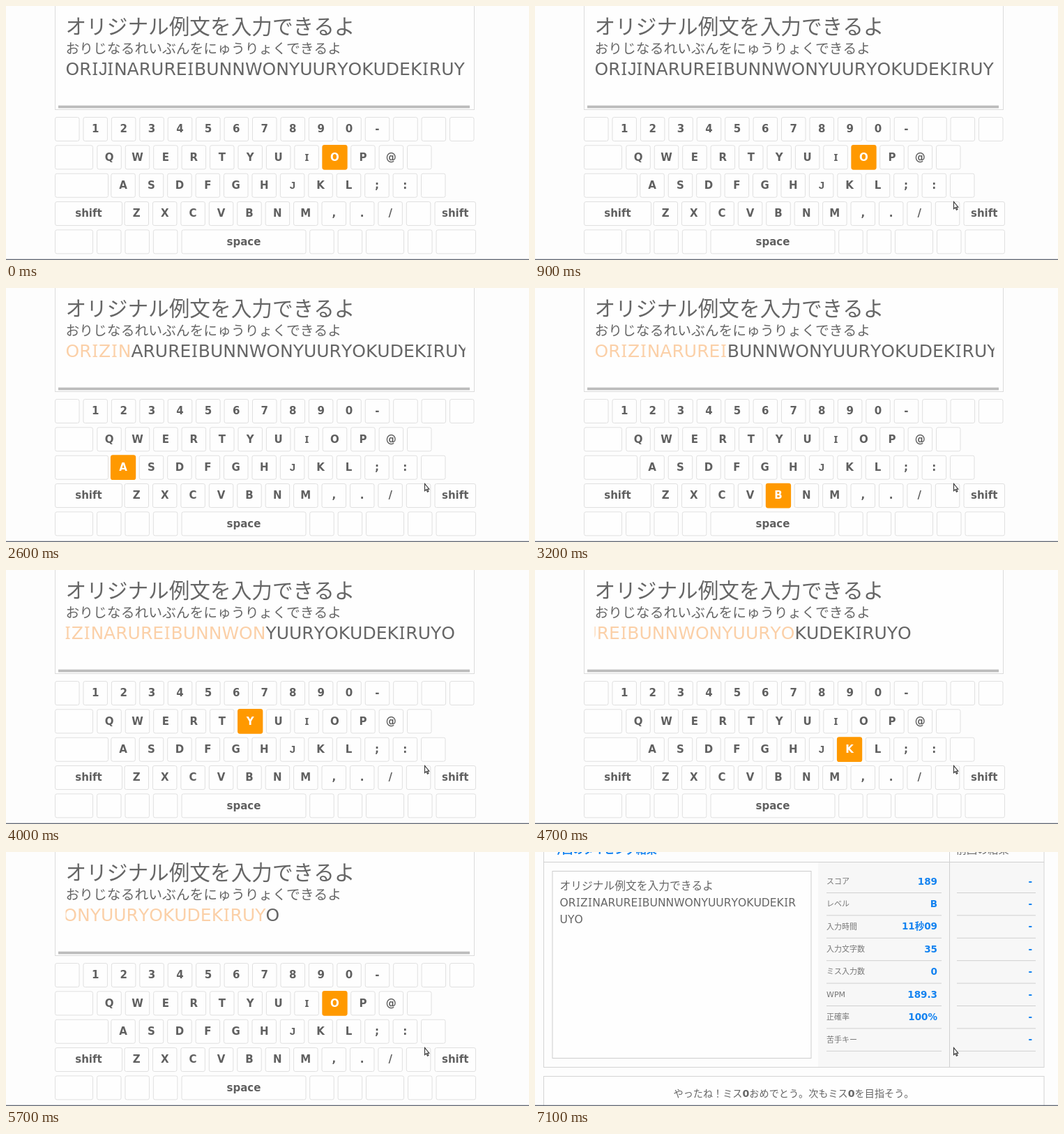
Write an HTML page that moves like this. It is 750 px wide and 364 px high and loops after 7.2 s.

```html
<!DOCTYPE html>
<html lang="ja">
<head>
<meta charset="utf-8">
<title>Typing practice</title>
<style>
  html, body { margin: 0; width: 100%; height: 100%; overflow: hidden; background: #fdfdfd; }
  svg { display: block; width: 750px; height: 364px; }
  text {
    font-family: 'DejaVu Sans', 'Noto Sans CJK JP', 'Noto Sans CJK', sans-serif;
    font-kerning: none; fill: #666; white-space: pre;
  }
  /* Serifed I, and a J that sits on the baseline */
  .I { font-family: 'Noto Sans', sans-serif; letter-spacing: .04em; }
  .J { font-family: 'Liberation Sans', sans-serif; letter-spacing: -.045em; }
  .key rect { fill: #fefefe; stroke: #e0e0e0; }
  .key text { font-size: 15px; font-weight: 700; fill: #606060; text-anchor: middle; }
  .key.on rect { fill: #ff9900; stroke: #ff9900; stroke-width: 1.8; }
  .key.on text { fill: #fff; }
  .done { fill: #fbd0a8; }
  .value { font-size: 13.5px; font-weight: 700; fill: #1583f0; text-anchor: end; }
  .label { font-size: 11px; fill: #777; }
</style>
</head>
<body>
<svg viewBox="0 0 750 364">
  <defs><clipPath id="window"><rect x="85.5" y="70" width="573" height="45"/></clipPath></defs>
  <rect width="750" height="364" fill="#fdfdfd"/>
  <g id="game"></g>
  <g id="result"></g>
  <rect y="362.7" width="750" height="1.3" fill="#616773"/>
  <path id="mouse" d="M0 0V10.2L2.3 8.2L3.9 11.8L5.4 11.1L3.9 7.7H6.3Z" fill="#fff" stroke="#333" stroke-width="1.1"/>
</svg>
<script>
const LOOP = 7200, STEP = 100, TYPE_START = 1900, TYPE_END = 5800;
const LEFT = 85.5, CARET = 372.5;
const JP = 'オリジナル例文を入力できるよ';
const TAIL = 'INARUREIBUNNWONYUURYOKUDEKIRUYO';
const GUIDE = 'ORIJ' + TAIL, TYPED = 'ORIZ' + TAIL;
const byId = id => document.getElementById(id);
const game = byId('game'), result = byId('result'), mouse = byId('mouse');

function add(parent, tag, attrs = {}, content = '') {
  const el = document.createElementNS('http://www.w3.org/2000/svg', tag);
  for (const k in attrs) el.setAttribute(k, attrs[k]);
  el.textContent = content;
  parent.append(el);
  return el;
}
// Fills an element with text, giving I and J their own face
function letters(el, content) {
  el.textContent = '';
  for (const part of content.split(/([IJ])/)) {
    if (!part) continue;
    const attrs = /^[IJ]$/.test(part) ? { class: part } : {};
    if (part === 'I') attrs.dx = '.04em';
    add(el, 'tspan', attrs, part);
  }
}
function text(parent, x, y, size, content, attrs = {}) {
  const el = add(parent, 'text', { x, y, 'font-size': size, ...attrs });
  letters(el, content);
  return el;
}
const box = (parent, x, y, width, height, attrs = {}) =>
  add(parent, 'rect', { x, y, width, height, fill: 'none', stroke: '#d4d4d4', ...attrs });
const line = (parent, d, stroke = '#d0d0d0') => add(parent, 'path', { d, stroke, fill: 'none' });

// Sentence panel
box(game, 70.5, -10, 601, 158.5, { fill: '#fefefe', stroke: '#dcdcdc' });
box(game, 75, 142.6, 590, 3.8, { fill: '#bcbcbc', stroke: 'none' });
text(game, LEFT, 40.2, 29.65, JP);
text(game, LEFT, 67.5, 19.8, 'おりじなるれいぶんをにゅうりょくできるよ');
const roman = text(add(game, 'g', { 'clip-path': 'url(#window)' }), LEFT, 99.2, 25, '');
const done = add(roman, 'tspan', { class: 'done' });
const rest = add(roman, 'tspan');

// Keyboard
const keys = {};
function key(x, row, w, label = '') {
  const y = 159 + row * 40.35;
  const g = add(game, 'g', { class: 'key' });
  add(g, 'rect', { x: x + .5, y: y + .5, width: w - 1, height: 34, rx: 2.5 });
  letters(add(g, 'text', { x: x + w / 2, y: y + 22.4 }), label);
  if (label) keys[label] = g;
}
const keyRow = (x, row, labels) =>
  [...labels].forEach((c, i) => key(x + i * 40.43, row, 35.5, c.trim()));

keyRow(70, 0, ' 1234567890-   ');
key(70, 1, 55);
keyRow(130.3, 1, 'QWERTYUIOP@ ');
key(70, 2, 77);
keyRow(150.3, 2, 'ASDFGHJKL;: ');
key(70, 3, 97, 'shift');
keyRow(169.5, 3, 'ZXCVBNM,./ ');
key(614.5, 3, 59.5, 'shift');
key(70, 4, 55);
keyRow(130, 4, '   ');
key(251.5, 4, 179, 'space');
keyRow(435.2, 4, '  ');
key(516, 4, 55);
keyRow(576, 4, ' ');
key(616.5, 4, 57.5);

// Result sheet
box(result, 406, 15, 324, 293, { fill: '#f7f7f7', stroke: 'none' });
box(result, 12.5, -10, 717.5, 318.5);
line(result, 'M12 14.5H730M594.5 0V308');
box(result, 25, 27.5, 371, 268, { fill: '#fefefe', stroke: '#cdcdcd' });
text(result, 24, 2, 15.1, '今回のタイピング結果', { 'font-weight': 700, style: 'fill:#1583f0' });
text(result, 604, 2, 15.1, '前回の結果');
text(result, 35.5, 54, 15.75, JP);
text(result, 35.5, 77.8, 15.55, TYPED.slice(0, 32));
text(result, 35.5, 101.8, 15.55, TYPED.slice(32));

const rows = [
  ['スコア', '189'], ['レベル', 'B'], ['入力時間', '11秒09'], ['入力文字数', '35'],
  ['ミス入力数', '0'], ['WPM', '189.3'], ['正確率', '100%'], ['苦手キー', '']
];
rows.forEach(([label, value], i) => {
  const y = 41.5 + i * 32.4;
  add(result, 'text', { x: 418, y: y + 4.2, class: 'label' }, label);
  add(result, 'text', { x: 577, y: y + 5, class: 'value' }, value);
  add(result, 'text', { x: 713, y: y + 5, class: 'value' }, '-');
  line(result, `M418 ${y + 17}H583M605 ${y + 17}H718`);
});
box(result, 12.5, 321.5, 717.5, 60, { fill: '#fefefe' });
const praise = text(result, 371, 351.3, 14.15, '', { 'text-anchor': 'middle' });
['やったね！ミス', '0', 'おめでとう。次もミス', '0', 'を目指そう。'].forEach(s =>
  add(praise, 'tspan', { 'font-weight': s === '0' ? 700 : 400 }, s));

function typedCount(t) {
  if (t < TYPE_START) return 0;
  return Math.min(34, Math.max(1, Math.floor(6.95 + .875 * (t - 2600) / STEP)));
}

function drawTyping(n) {
  const words = n > 3 ? TYPED : GUIDE;
  letters(done, words.slice(0, n));
  letters(rest, words.slice(n));
  roman.setAttribute('x', LEFT);
  const caret = roman.getStartPositionOfChar(n).x;
  roman.setAttribute('x', LEFT - Math.max(0, caret - CARET));
  for (const k in keys) keys[k].classList.toggle('on', k === words[n]);
}

function drawMouse(t) {
  const p = Math.min(1, t / 800), left = (1 - p) ** 2;
  mouse.setAttribute('transform', `translate(${600.5 + 142 * left} ${280.5 + 86 * left})`);
  mouse.style.display = t < STEP ? 'none' : '';
}

let shown = -1;
function draw(now) {
  const t = Math.floor(now % LOOP / STEP) * STEP;
  if (t === shown) return;
  shown = t;
  const finished = t >= TYPE_END;
  game.style.display = finished ? 'none' : '';
  result.style.display = finished ? '' : 'none';
  if (finished) result.style.opacity = Math.min(1, .6 + (t - TYPE_END) / 500);
  else drawTyping(typedCount(t));
  drawMouse(t);
}

const start = performance.now();
function tick() {
  draw(performance.now() - start);
  requestAnimationFrame(tick);
}
tick();
</script>
</body>
</html>
```
